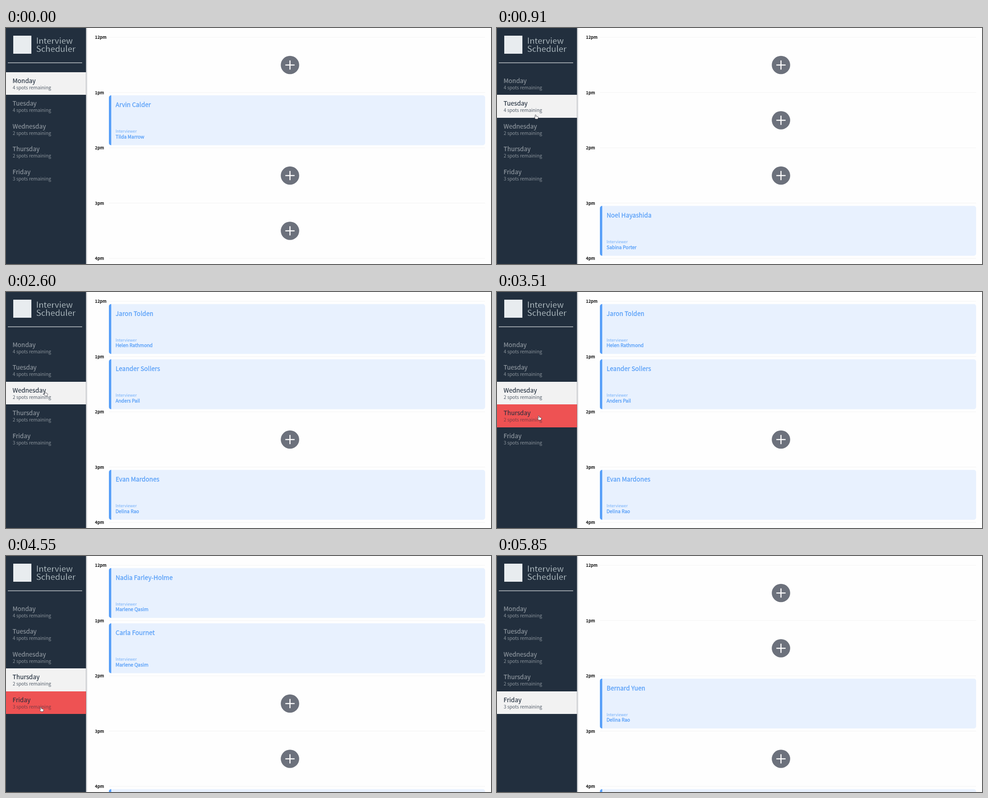
These frames come from a looping animation (1070 px wide and 523 px high, 5980 ms). An HTML page with a canvas:

```html
<!DOCTYPE html>
<html lang="en">
<head>
<meta charset="utf-8">
<title>Interview Scheduler</title>
<style>
  html, body { margin: 0; width: 100%; height: 100%; overflow: hidden; background: #fefefe; }
  canvas { display: block; width: 1070px; height: 523px; }
</style>
</head>
<body>
<canvas id="stage"></canvas>
<script>
const W = 1070, H = 523, LOOP = 5980, TICK = 130;
const FONT = '"Noto Sans CJK JP", "Noto Sans CJK SC", "Noto Sans CJK", "Open Sans", sans-serif';
const NAVY = '#222f3e', RED = '#ee5253', PALE = '#f2f2f2', BLUE = '#579ff8';
const SIDE = 176.6, ROW_TOP = 98, ROW_H = 50.4;
const HOUR_TOP = 20.5, HOUR_H = 122.5;
const HOURS = ['12pm', '1pm', '2pm', '3pm', '4pm'];

// Bookings are keyed by hour slot: [student, interviewer]
const DAYS = [
  { name: 'Monday', spots: 4, from: 0, booked: { 1: ['Arvin Calder', 'Tilda Marrow'] } },
  { name: 'Tuesday', spots: 4, from: 910, booked: { 3: ['Noel Hayashida', 'Sabina Porter'] } },
  { name: 'Wednesday', spots: 2, from: 2470, booked: {
    0: ['Jaron Tolden', 'Helen Rathmond'],
    1: ['Leander Sollers', 'Anders Pail'],
    3: ['Evan Mardones', 'Delina Rao'] } },
  { name: 'Thursday', spots: 2, from: 3640, booked: {
    0: ['Nadia Farley-Holme', 'Marlene Qasim'],
    1: ['Carla Fournet', 'Marlene Qasim'],
    4: ['', ''] } },
  { name: 'Friday', spots: 3, from: 4680, booked: {
    2: ['Bernard Yuen', 'Delina Rao'],
    4: ['', ''] } }
];

// Pointer path: [time, x, y] of the fingertip
const PATH = [
  [0, 80, 540], [130, 82, 505], [390, 84, 345], [650, 86, 215], [780, 85, 194],
  [910, 85, 192], [1690, 85, 192], [2340, 86, 220], [2990, 86, 221], [3510, 92, 274],
  [3770, 92, 274], [4550, 77, 335], [5200, 78, 336], [5850, 84, 540]
];

const canvas = document.getElementById('stage');
const ctx = canvas.getContext('2d');
const dpr = window.devicePixelRatio || 1;
canvas.width = Math.round(W * dpr);
canvas.height = Math.round(H * dpr);

function rect(x, y, w, h, color) {
  ctx.fillStyle = color;
  ctx.fillRect(x, y, w, h);
}

// An edge in the text colour thickens the letters, one in the backdrop colour thins them
function text(str, x, y, size, color, { weight = 400, edge = 0, edgeColor = color } = {}) {
  ctx.font = `${weight} ${size}px ${FONT}`;
  ctx.fillStyle = color;
  ctx.fillText(str, x, y);
  if (!edge) return;
  ctx.lineWidth = edge;
  ctx.lineJoin = 'round';
  ctx.strokeStyle = edgeColor;
  ctx.strokeText(str, x, y);
}

function pointerAt(t) {
  const i = PATH.findIndex(key => key[0] > t);
  if (i < 0) return { x: 0, y: H + 50 };
  const [t0, x0, y0] = PATH[i - 1], [t1, x1, y1] = PATH[i];
  const k = (t - t0) / (t1 - t0);
  return { x: x0 + (x1 - x0) * k, y: y0 + (y1 - y0) * k };
}

function drawHeader() {
  const thin = { edge: 0.4, edgeColor: NAVY };
  rect(16, 17, 40, 40, '#e8ecef');
  text('Interview', 66.5, 35, 18.4, '#d3dfe2', thin);
  text('Scheduler', 66.5, 53, 18.4, '#d3dfe2', thin);
  rect(4, 76.5, 164, 1.2, '#e6e9ea');
}

function drawSidebar(active, hover) {
  const shade = ctx.createLinearGradient(SIDE, 0, SIDE + 4, 0);
  shade.addColorStop(0, 'rgba(34,47,62,0.22)');
  shade.addColorStop(1, 'rgba(34,47,62,0)');
  rect(SIDE, 0, 4, H, shade);
  rect(0, 0, SIDE, H, NAVY);
  drawHeader();

  DAYS.forEach((day, i) => {
    const y = ROW_TOP + i * ROW_H;
    const top = Math.round(y), height = Math.round(y + ROW_H) - top;
    let title = '#929aa2', note = '#8b949c';
    if (i === active) {
      rect(0, top, SIDE, height, PALE);
      title = NAVY;
      note = '#535d69';
    } else if (i === hover) {
      rect(0, top, SIDE, height, RED);
      title = '#33303e';
      note = '#7c3b45';
    }
    text(day.name, 14.5, y + 24, 13.65, title, { edge: 0.15 });
    text(`${day.spots} spots remaining`, 14.7, y + 38, 10.25, note);
  });
}

function drawPlus(y) {
  ctx.fillStyle = '#6c717c';
  ctx.beginPath();
  ctx.arc(626.5, y, 20.3, 0, Math.PI * 2);
  ctx.fill();
  rect(616.3, y - 1.2, 20.4, 2.4, '#fff');
  rect(625.3, y - 10.2, 2.4, 20.4, '#fff');
}

function drawCard(y, [student, interviewer]) {
  ctx.save();
  ctx.beginPath();
  ctx.roundRect(227, y + 6.2, 830, 110.5, 5);
  ctx.clip();
  rect(227, y, 830, HOUR_H, '#e8f1fe');
  rect(227, y, 5.2, HOUR_H, BLUE);
  ctx.restore();
  text(student, 241.7, y + 32.3, 13.65, BLUE, { edge: 0.3 });
  text('Interviewer', 241.7, y + 89.2, 8.75, '#6fadf9');
  text(interviewer, 241.7, y + 101.5, 10.4, BLUE, { edge: 0.35 });
}

function drawSchedule(day) {
  HOURS.forEach((hour, i) => {
    const y = HOUR_TOP + i * HOUR_H;
    text(hour, 196.3, y + 3.6, 9.15, '#0c0c0c', { weight: 700 });
    rect(227, y - 0.5, 830, 1, '#f3f3f3');
    if (day.booked[i]) drawCard(y, day.booked[i]);
    else drawPlus(y + 61.5);
  });
}

function drawHand({ x, y }) {
  ctx.save();
  ctx.translate(x, y);
  ctx.beginPath();
  ctx.moveTo(-1, 1);
  ctx.quadraticCurveTo(0, -0.8, 1.1, 1);
  ctx.lineTo(1.3, 3.6);
  ctx.lineTo(4.6, 4.2);
  ctx.quadraticCurveTo(6.4, 4.6, 6, 6.6);
  ctx.lineTo(4.9, 9.8);
  ctx.lineTo(0.2, 9.8);
  ctx.lineTo(-2.6, 6.4);
  ctx.quadraticCurveTo(-2.6, 5, -0.8, 6);
  ctx.closePath();
  ctx.fillStyle = '#fff';
  ctx.strokeStyle = '#3a3a42';
  ctx.lineWidth = 0.8;
  ctx.fill();
  ctx.stroke();
  ctx.restore();
}

function draw(now) {
  const t = Math.floor((now % LOOP) / TICK) * TICK;
  const active = DAYS.filter(day => day.from <= t).length - 1;
  const pointer = pointerAt(t);
  const hover = Math.floor((pointer.y - ROW_TOP) / ROW_H);

  ctx.setTransform(dpr, 0, 0, dpr, 0, 0);
  rect(0, 0, W, H, '#fefefe');
  drawSchedule(DAYS[active]);
  drawSidebar(active, hover);
  drawHand(pointer);
}

const start = performance.now();
function loop() {
  draw(performance.now() - start);
  requestAnimationFrame(loop);
}
loop();
</script>
</body>
</html>
```
